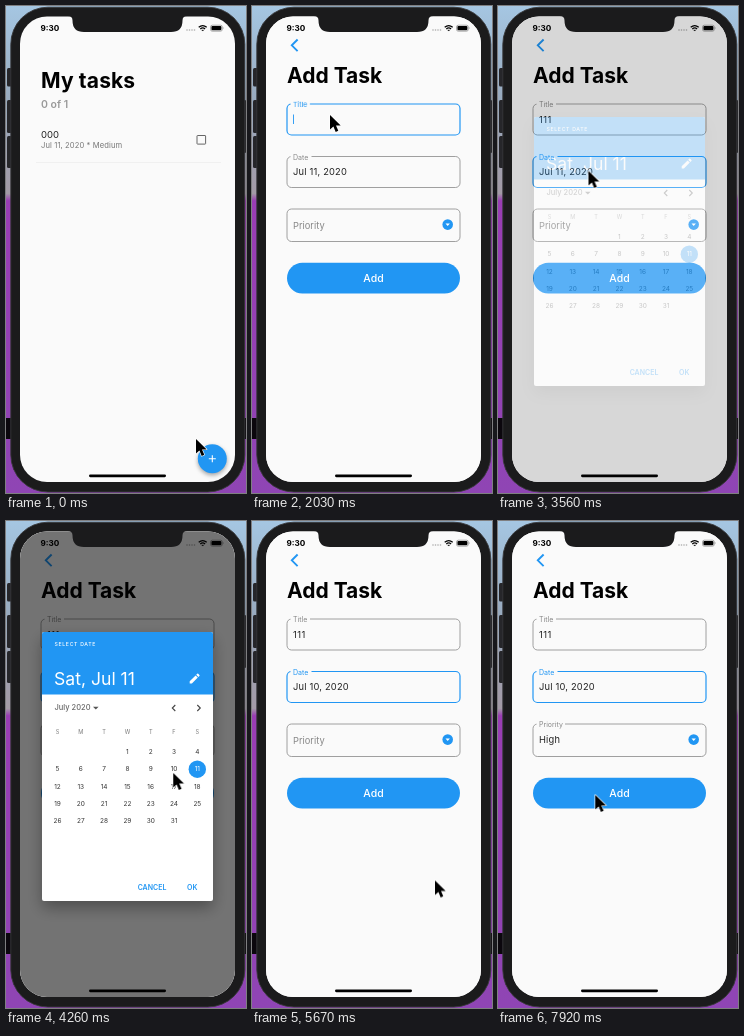
Animation of 240 by 487 pixels, one loop 8 s. Source, as an HTML page:

```html
<!DOCTYPE html>
<html lang="en">
<head>
<meta charset="utf-8">
<title>Task app</title>
<style>
  html, body { margin: 0; width: 100%; height: 100%; overflow: hidden; background: #1b1b1c; }
  svg { display: block; width: 100%; height: 100%; font-family: Inter, Roboto, sans-serif; }

  .loop { animation-duration: 8s; animation-iteration-count: infinite; animation-timing-function: linear; }
  .hard { animation-timing-function: step-end; }

  .h1 { font-size: 21px; font-weight: 700; fill: #000; }
  .value { font-size: 9.3px; letter-spacing: .2px; fill: #222; }
  .field { color: #888; stroke-width: .8px; }
  .field .box { fill: none; stroke: currentColor; }
  .label text { font-size: 7px; fill: currentColor; }
  .label rect, .bg { fill: #fafafa; }
  .blue { fill: #2196f3; }
  .day { font-size: 6.5px; fill: #333; text-anchor: middle; }
  .week { font-size: 5.6px; fill: #777; text-anchor: middle; }
  .action { font-size: 7px; font-weight: 600; fill: #2196f3; text-anchor: middle; }

  /* page change */
  .home { animation-name: leave; }
  .page { animation-name: enter; }
  @keyframes leave {
    0%, 9.62% { transform: translateX(0); animation-timing-function: cubic-bezier(.35, .91, .33, .97); }
    14.62%, 100% { transform: translateX(-71.7px); }
  }
  @keyframes enter {
    0%, 9.62% { transform: translateX(226px); animation-timing-function: cubic-bezier(.35, .91, .33, .97); }
    14.62%, 100% { transform: translateX(0); }
  }

  /* fields */
  .title { animation-name: title-focus; }
  .date { animation-name: date-focus; }
  @keyframes title-focus {
    20.5% { color: #2196f3; stroke-width: 1.2px; }
    0%, 43.5%, 100% { color: #888; stroke-width: .8px; }
  }
  @keyframes date-focus {
    43.5%, 91.1%, 100% { color: #2196f3; stroke-width: 1.2px; }
    0%, 80.75% { color: #888; stroke-width: .8px; }
  }
  .title-label { animation-name: title-float; }
  .date-label { transform: translate(41px, 153.5px); }
  .prio-label { animation-name: prio-float; }
  @keyframes title-float {
    0%, 20.5% { transform: translate(41px, 117px) scale(1.33); animation-timing-function: ease-out; }
    23%, 100% { transform: translate(41px, 101px) scale(1); }
  }
  @keyframes prio-float {
    0%, 91.1% { transform: translate(41px, 222.6px) scale(1.33); animation-timing-function: ease-out; }
    93.6%, 100% { transform: translate(41px, 206.3px) scale(1); }
  }
  .typing { animation-name: typing; }
  @keyframes typing {
    0% { transform: translateX(0); }
    29.7% { transform: translateX(4.7px); }
    32.7% { transform: translateX(9.4px); }
    35.6%, 100% { transform: translateX(14.2px); }
  }
  .caret { animation-name: caret; }
  @keyframes caret {
    0%, 21.5% { opacity: 0; }
    22%, 38.5% { opacity: 1; }
    40%, 100% { opacity: 0; }
  }

  /* swaps of text */
  .old-date { animation-name: off-date; }
  .new-date { animation-name: on-date; }
  .old-pick { animation-name: off-pick; }
  .new-pick { animation-name: on-pick; }
  .chosen { animation-name: on-prio; }
  @keyframes off-date { 0% { opacity: 1; } 68.5%, 100% { opacity: 0; } }
  @keyframes on-date { 0% { opacity: 0; } 68.5%, 100% { opacity: 1; } }
  @keyframes off-pick { 0% { opacity: 1; } 55%, 100% { opacity: 0; } }
  @keyframes on-pick { 0% { opacity: 0; } 55%, 100% { opacity: 1; } }
  @keyframes on-prio { 0% { opacity: 0; } 91.1%, 100% { opacity: 1; } }

  /* date dialog */
  .dialog { animation-name: dialog; }
  .sheet { filter: drop-shadow(0 7px 8px rgba(0, 0, 0, .32)); }
  @keyframes dialog {
    0%, 44.2% { opacity: 0; animation-timing-function: ease-out; }
    46.1%, 68.6% { opacity: 1; animation-timing-function: ease-in; }
    70.4%, 100% { opacity: 0; }
  }

  /* priority menu */
  .menu { animation-name: menu; }
  .menu-card { fill: #fff; transform-origin: 0 203px; animation-name: unfold; }
  .shade { filter: drop-shadow(0 2px 2.2px rgba(0, 0, 0, .42)); }
  .items { animation-name: items; }
  @keyframes menu {
    0%, 80.75% { opacity: 0; }
    81.7%, 91.1% { opacity: 1; }
    92.1%, 100% { opacity: 0; }
  }
  @keyframes unfold {
    0%, 81.7% { transform: scaleY(.37); }
    82.7%, 100% { transform: scaleY(1); }
  }
  @keyframes items {
    0%, 82.4% { opacity: 0; }
    84.4%, 100% { opacity: 1; }
  }

  /* pointer */
  .pointer { animation-name: travel; animation-timing-function: ease-in-out; }
  .arrow { animation-name: hide; }
  @keyframes travel {
    0%, 1% { transform: translate(190px, 433px); }
    7.5%, 14.2% { transform: translate(202.3px, 450px); }
    19.4%, 36% { transform: translate(78px, 109px); }
    39.7%, 41.7% { transform: translate(90.5px, 174px); }
    43%, 46.2% { transform: translate(90.5px, 165px); }
    51.7% { transform: translate(167.2px, 246px); }
    53.2%, 56% { transform: translate(167.2px, 252px); }
    62.1% { transform: translate(183px, 341px); }
    66.5%, 72.2% { transform: translate(183px, 359.5px); }
    78.4%, 83% { transform: translate(66px, 212px); }
    87%, 92.3% { transform: translate(66.8px, 262px); }
    98.9%, 100% { transform: translate(97.3px, 274px); }
  }
  @keyframes hide { 0%, 36%, 100% { opacity: 1; } 26% { opacity: 0; } }
</style>
</head>
<body>
<svg viewBox="0 0 240 487" preserveAspectRatio="none">
  <defs>
    <linearGradient id="sky" x1="0" y1="0" x2="0" y2="1">
      <stop offset="0" stop-color="#a5c6e2"/>
      <stop offset=".2" stop-color="#98a9bd"/>
      <stop offset=".385" stop-color="#a39aa6"/>
      <stop offset=".4" stop-color="#9a3db4"/>
      <stop offset="1" stop-color="#8f45b4"/>
    </linearGradient>
    <linearGradient id="edge">
      <stop offset="0" stop-color="#000" stop-opacity="0"/>
      <stop offset="1" stop-color="#000" stop-opacity=".24"/>
    </linearGradient>
    <clipPath id="screen"><rect x="14" y="10.5" width="215" height="465.5" rx="27"/></clipPath>
  </defs>

  <rect width="240" height="487" fill="url(#sky)"/>
  <rect y="412" width="240" height="21" fill="#0b070d"/>
  <g fill="#26262a">
    <rect x="1" y="62" width="5" height="18.500" rx="1.500"/>
    <rect x="1" y="94" width="5" height="33" rx="1.500"/>
    <rect x="1" y="130" width="5" height="32" rx="1.500"/>
    <rect x="237" y="94" width="3" height="53" rx="1"/>
  </g>
  <rect x="4.800" y="1.200" width="234" height="484.800" rx="37" fill="#1b1b1c" stroke="#39393c" stroke-width=".9"/>

  <g clip-path="url(#screen)">
    <rect class="bg" x="14" y="10" width="215" height="467"/>

    <g class="home loop">
      <text class="h1" x="35" y="82" letter-spacing=".15">My tasks</text>
      <text x="35" y="102.300" font-size="10.500" font-weight="600" fill="#999">0 of 1</text>
      <text x="35" y="131.800" font-size="9.500" fill="#222">000</text>
      <text x="35" y="142.300" font-size="7.600" fill="#777" letter-spacing=".1">Jul 11, 2020 * Medium</text>
      <rect x="191" y="129.500" width="8.600" height="8.600" rx=".5" fill="none" stroke="#666"/>
      <path d="M30 156.500H215" stroke="#eee" stroke-width=".8"/>
      <circle class="blue" cx="206.300" cy="452.700" r="14.500" style="filter:drop-shadow(0 2px 2px rgba(0,0,0,.35))"/>
      <path d="M202.800 452.700h7M206.300 449.200v7" stroke="#fff" stroke-width="1.100"/>
    </g>

    <g class="page loop">
      <rect x="3" y="10" width="11" height="467" fill="url(#edge)"/>
      <rect class="bg" x="14" y="10" width="215" height="467"/>
      <path d="M45.600 33.500L39.800 39.300L45.600 45.100" fill="none" stroke="#2196f3" stroke-width="1.900"/>
      <text class="h1" x="35" y="77">Add Task</text>

      <g class="field title loop hard">
        <rect class="box" x="35" y="98" width="173" height="31" rx="4.500"/>
        <g class="label title-label loop">
          <rect x="-2.500" y="-5" width="19.500" height="5"/>
          <text>Title</text>
        </g>
        <g class="loop" style="animation-name:on-typed">
          <text class="value" x="41" y="116.700" style="letter-spacing:.5px">111</text>
          <g class="typing loop hard">
            <rect class="bg" x="41" y="108.500" width="18" height="10" id="cover"/>
            <rect class="blue caret loop" x="41" y="108.500" width=".9" height="9.500"/>
          </g>
        </g>
      </g>

      <g class="field date loop hard">
        <rect class="box" x="35" y="150.500" width="173" height="31" rx="4.500"/>
        <g class="label date-label">
          <rect x="-2.500" y="-5" width="21" height="5"/>
          <text>Date</text>
        </g>
        <text class="value old-date loop hard" x="41" y="169">Jul 11, 2020</text>
        <text class="value new-date loop hard" x="41" y="169">Jul 10, 2020</text>
      </g>

      <g class="field">
        <rect class="box" x="35" y="203" width="173" height="32.500" rx="4.500"/>
        <g class="label prio-label loop">
          <rect x="-2.500" y="-5" width="28.500" height="5"/>
          <text>Priority</text>
        </g>
        <text class="value chosen loop hard" x="41" y="222.300">High</text>
        <circle class="blue" cx="195.700" cy="218.600" r="5.300"/>
        <path d="M193.500 217.600h4.400l-2.200 2.300z" fill="#fff"/>
      </g>

      <rect class="blue" x="35" y="256.700" width="173" height="30.800" rx="15.400"/>
      <text x="121.500" y="275.800" font-size="10.500" font-weight="500" fill="#fff" text-anchor="middle">Add</text>

      <g class="menu loop">
        <g class="shade"><rect class="menu-card loop" x="33" y="203" width="181" height="82" rx="1"/></g>
        <g class="items loop">
          <text class="value" x="41" y="222.300">Low</text>
          <text class="value" x="41" y="247.200">Medium</text>
          <text class="value" x="41" y="272.100">High</text>
        </g>
      </g>
    </g>

    <text x="34.500" y="24.800" font-size="8.200" font-weight="700">9:30</text>
    <g fill="#aaa">
      <circle cx="181" cy="24" r=".8"/><circle cx="183.500" cy="24" r=".8"/>
      <circle cx="186" cy="24" r=".8"/><circle cx="188.500" cy="24" r=".8"/>
    </g>
    <g fill="none" stroke="#000" stroke-width="1.200">
      <path d="M192.700 21.300Q196.700 17.900 200.700 21.300M194.300 23Q196.700 20.900 199.100 23"/>
      <path d="M195.600 23.900h2.200l-1.100 1.200z" fill="#000" stroke-width=".3"/>
    </g>
    <rect x="204.500" y="19.200" width="11.800" height="6" rx="1.800" fill="none" stroke="#777" stroke-width=".6"/>
    <rect x="205.400" y="20.100" width="10" height="4.200" rx="1"/>
    <path d="M217.300 21.100q1 1.100 0 2.200z" fill="#777"/>

    <g class="dialog loop">
      <rect x="14" y="10" width="215" height="467" fill="#000" fill-opacity=".54"/>
      <rect class="sheet" x="36" y="111" width="171" height="269" rx="2" fill="#fff"/>
      <path class="blue" d="M36 173.500V113q0-2 2-2H205q2 0 2 2V173.500z"/>
      <g fill="#fff">
        <text x="48.500" y="125" font-size="5.200" font-weight="500" letter-spacing=".65">SELECT DATE</text>
        <g font-size="17.600">
          <text class="old-pick loop hard" x="48" y="164">Sat, Jul 11</text>
          <text class="new-pick loop hard" x="48" y="164">Fri, Jul 10</text>
        </g>
        <path d="M183.700 162.500v-2.200l5.900-5.900 2.200 2.200-5.900 5.900zM190.200 153.800l1-1q.5-.5 1 0l1.200 1.200q.5.5 0 1l-1 1z"/>
      </g>
      <text x="48.500" y="189.300" font-size="7.500" font-weight="500" fill="#666">July 2020</text>
      <path d="M87 185.700h5.600l-2.800 2.800z" fill="#555"/>
      <path d="M169.300 184l-3 3 3 3M191.300 184l3 3-3 3" fill="none" stroke="#444" stroke-width="1.100"/>
      <circle class="blue old-pick loop hard" cx="191.300" cy="248.200" r="8.700"/>
      <g class="new-pick loop hard">
        <circle cx="191.300" cy="248.200" r="8.500" fill="none" stroke="#2196f3" stroke-width=".6"/>
        <circle class="blue" cx="168" cy="248.200" r="8.700"/>
      </g>
      <g id="days"></g>
      <text class="action" x="146" y="368.800">CANCEL</text>
      <text class="action" x="186.200" y="368.800">OK</text>
    </g>

    <rect x="83" y="468.500" width="77" height="2.700" rx="1.350"/>
  </g>

  <path d="M62 10q4.500 0 4.500 4.500q0 11.500 11.500 11.500h87q11.500 0 11.500-11.500q0-4.500 4.500-4.500z" fill="#1b1b1c"/>

  <g class="pointer loop" style="animation-timing-function:ease-in-out">
    <path class="arrow loop hard" d="M0 0V14.600L3.400 11.500L5.700 16.900L8.300 15.800L6 10.500H10.700z" stroke="#fff" stroke-width="1.200" stroke-linejoin="round" paint-order="stroke"/>
  </g>
</svg>
<script>
  const days = document.getElementById('days');
  const put = (label, col, y, cls, fill) => {
    const t = document.createElementNS('http://www.w3.org/2000/svg', 'text');
    t.setAttribute('x', 51.5 + col * 23.3);
    t.setAttribute('y', y);
    t.setAttribute('class', cls);
    if (fill) t.style.fill = fill;
    t.textContent = label;
    days.append(t);
  };
  [...'SMTWTFS'].forEach((d, i) => put(d, i, 213.4, 'week'));
  for (let d = 1; d <= 31; d++) {
    const cell = d + 2, col = cell % 7, y = 233.2 + Math.floor(cell / 7) * 17.25;
    if (d === 10 || d === 11) {
      put(d, col, y, 'day old-pick loop hard', d === 11 ? '#fff' : '');
      put(d, col, y, 'day new-pick loop hard', d === 10 ? '#fff' : '#2196f3');
    } else put(d, col, y, 'day');
  }
</script>
</body>
</html>
```
